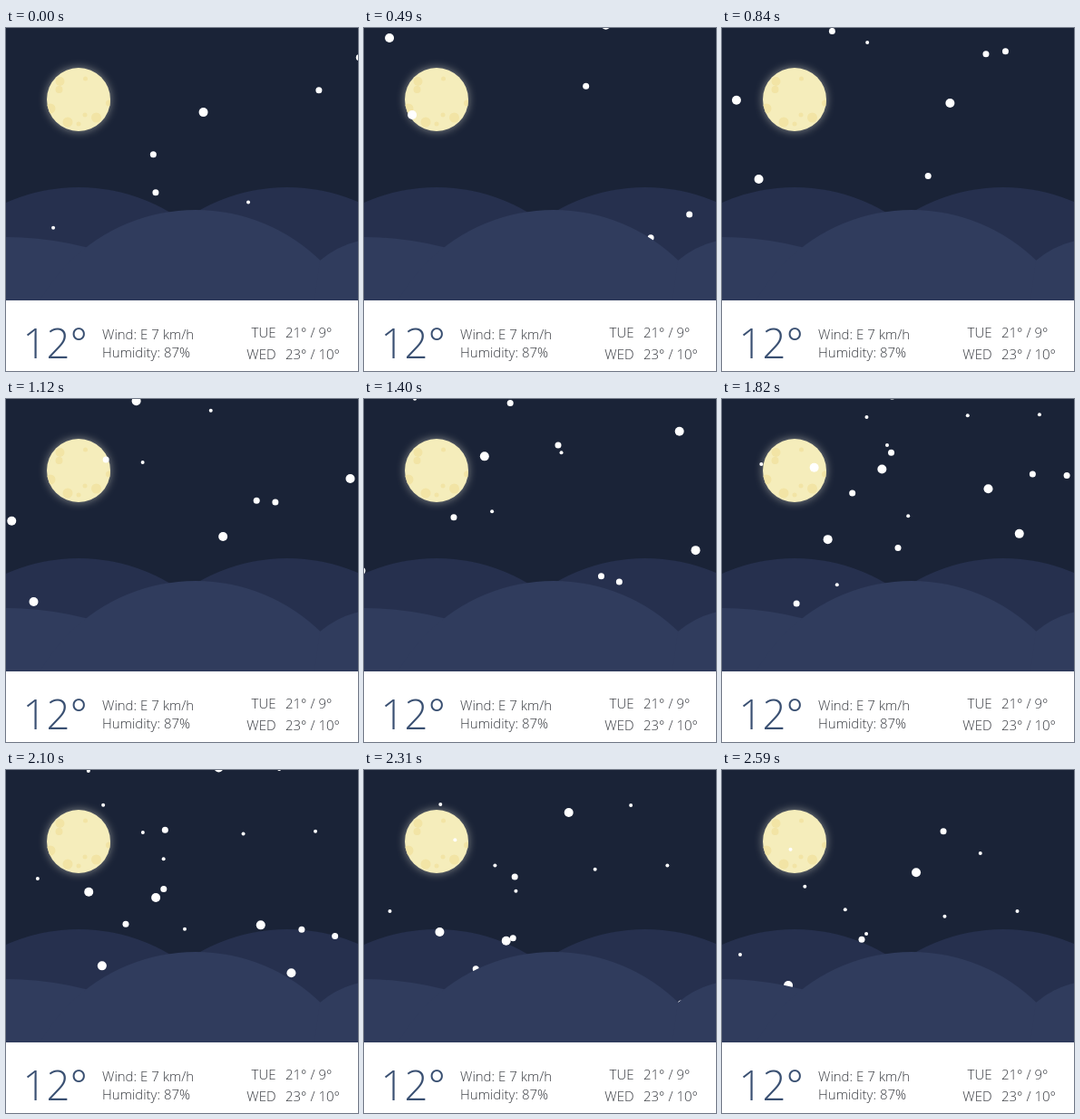
Animation, 388 px wide and 379 px high, one loop 2660 ms. Source, as an HTML page:

```html
<!DOCTYPE html>
<html lang="en">
<head>
<meta charset="utf-8">
<title>Snowy night</title>
<style>
  html, body { margin: 0; width: 100%; height: 100%; overflow: hidden; background: #fff; }
  svg { display: block; width: 388px; height: 379px; }
  text { font: 300 15px "Open Sans", sans-serif; fill: #36393f; }
  .temp { font-size: 45.5px; fill: #3a5072; }
  .day { text-anchor: end; }
</style>
</head>
<body>
<svg viewBox="0 0 388 379">
  <defs>
    <clipPath id="scene"><rect width="388" height="301"/></clipPath>
    <clipPath id="disc"><circle cx="80" cy="79" r="35"/></clipPath>
    <filter id="blur" x="-50%" y="-50%" width="200%" height="200%">
      <feGaussianBlur stdDeviation="5"/>
    </filter>
  </defs>
  <g clip-path="url(#scene)">
    <rect width="388" height="301" fill="#1a2337"/>
    <circle cx="80" cy="79" r="35.5" fill="#e2e0cf" opacity=".5" filter="url(#blur)"/>
    <circle cx="80" cy="79" r="35" fill="#f5edbb"/>
    <g fill="#f2e4a5" clip-path="url(#disc)">
      <circle cx="59.5" cy="59" r="5"/>
      <circle cx="58.5" cy="68" r="4"/>
      <circle cx="87.5" cy="56" r="2.5"/>
      <circle cx="49" cy="89" r="5.5"/>
      <circle cx="68" cy="104" r="5.5"/>
      <circle cx="99.5" cy="99" r="5.5"/>
      <circle cx="87" cy="96" r="2.5"/>
      <circle cx="80" cy="106" r="2.5"/>
      <circle cx="113.5" cy="83" r="3.5"/>
    </g>
    <g fill="#26304e">
      <circle cx="80" cy="373" r="197"/>
      <circle cx="310" cy="373" r="197"/>
    </g>
    <g id="snow" fill="#fff"></g>
    <g fill="#303c5d">
      <circle cx="0" cy="581" r="350"/>
      <circle cx="209" cy="398" r="197"/>
      <path d="M346 257Q365 241 388 235.5V301H340Z"/>
    </g>
  </g>
  <text class="temp" x="18.5" y="365">12°</text>
  <text x="106" y="344">Wind: E 7 km/h</text>
  <text x="106" y="364">Humidity: 87%</text>
  <text class="day" x="297.5" y="342">TUE</text>
  <text x="308" y="342">21° / 9°</text>
  <text class="day" x="297.5" y="366">WED</text>
  <text x="308" y="366">23° / 10°</text>
</svg>
<script>
const LOOP = 2660, STEP = 70;
const FALL = 592, LEAD = 3.5;
const SLOPE = Math.tan(Math.PI / 18);

// Within a layer each flake falls a fixed time faster than the one before.
// starts: where a flake crosses the top edge and when (ms)
const LAYERS = [
  { r: 5, slowest: 3015, gain: 102, starts: [
    [30, 434], [70, 18], [115, 1460], [144, 1110], [190, 1479],
    [234, 2111], [266, 503], [311, 1434], [354, 1267], [395, 808]] },
  { r: 3.5, slowest: 2605, gain: 103.5, starts: [
    [122, 825], [162, 1381], [187, 1832], [197, 1590], [223, 1211],
    [256, 2351], [296, 744], [317, 758], [357, 1571], [395, 1581]] },
  { r: 2, slowest: 3560, gain: 55, starts: [
    [228, 1043], [191, 1518], [56, 1401], [163, 1705], [91, 2095],
    [353, 1724], [114, 1888], [274, 1722], [301, 2105], [163, 757]] }
];

const snow = document.getElementById("snow");
const mod = (a, n) => ((a % n) + n) % n;

const flakes = LAYERS.flatMap(({ r, slowest, gain, starts }) =>
  starts.map(([x, entry], i) => {
    const dot = document.createElementNS(snow.namespaceURI, "circle");
    dot.setAttribute("r", r);
    snow.append(dot);
    return { dot, x, entry, speed: FALL / (slowest - gain * i) };
  }));

function draw(time) {
  const t = Math.floor((time % LOOP) / STEP) * STEP;
  for (const { dot, x, entry, speed } of flakes) {
    const y = mod(speed * (t - entry) + LEAD, FALL) - LEAD;
    dot.setAttribute("cx", x - y * SLOPE);
    dot.setAttribute("cy", y);
  }
}

const start = performance.now();
function tick() {
  draw(performance.now() - start);
  requestAnimationFrame(tick);
}
tick();
</script>
</body>
</html>
```
